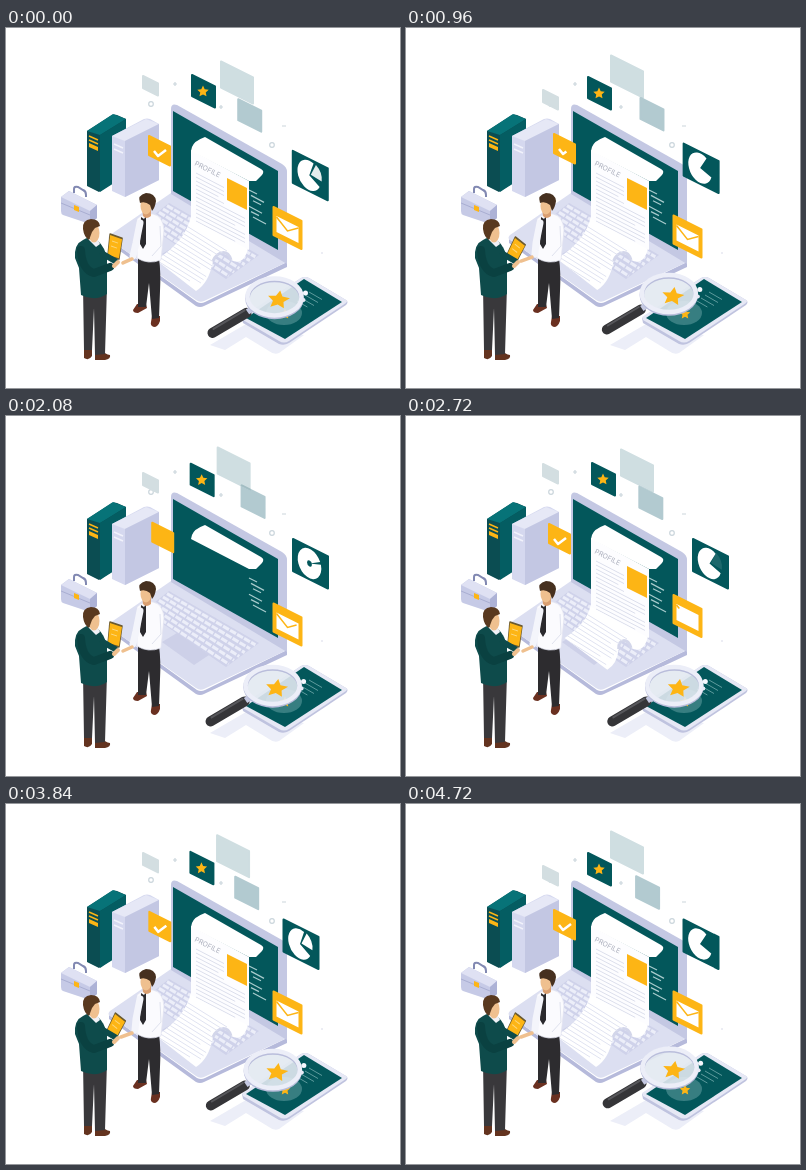
Animation of 394 by 360 pixels, one loop 4.8 s. Source, as an HTML page:

```html
<!DOCTYPE html>
<html lang="en">
<head>
<meta charset="utf-8">
<style>
html, body { margin: 0; width: 100%; height: 100%; overflow: hidden; background: #fff; }
svg { display: block; width: 394px; height: 360px; }
</style>
</head>
<body>
<svg id="stage" viewBox="0 0 394 360" xmlns="http://www.w3.org/2000/svg"></svg>
<script>
const TEAL = '#03575b', GOLD = '#fdb515', SKIN = '#efc08f';
const LOOP = 4800, STEP = 80;
const $ = id => document.getElementById(id);
const lerp = (a, b, k) => a + (b - a) * k;
const clamp = v => Math.max(0, Math.min(1, v));

const poly = (pts, fill, extra = '') => `<polygon points="${pts}" fill="${fill}" ${extra}/>`;
const path = (d, fill, extra = '') => `<path d="${d}" fill="${fill}" ${extra}/>`;
const line = (d, color, w, extra = '') => path(d, 'none', `stroke="${color}" stroke-width="${w}" ${extra}`);
const group = (id, body) => `<g id="${id}">${body}</g>`;
const round = 'stroke-linecap="round" stroke-linejoin="round"';

// Upright isometric panel, origin at its top left corner
const panel = (w, h, fill) =>
  poly(`1,1 ${w - 1},${w / 2} ${w - 1},${w / 2 + h - 1} 1,${h}`, fill, `stroke="${fill}" stroke-width="2" stroke-linejoin="round"`);

function star(r, cx = 0, cy = 0) {
  return Array.from({ length: 10 }, (_, i) => {
    const a = i * Math.PI / 5 - Math.PI / 2, q = i % 2 ? r * .48 : r;
    return `${(cx + q * Math.cos(a)).toFixed(2)},${(cy + q * Math.sin(a)).toFixed(2)}`;
  }).join(' ');
}

// Parallel text rows sloping down to the right
function rows(n, x, y, w, gap, slope, color, dx = 0) {
  let d = '';
  for (let i = 0; i < n; i++) {
    const len = w * (i % 4 === 3 ? .8 : 1);
    d += `M${x + dx * i} ${y + gap * i}l${len} ${len * slope}`;
  }
  return line(d, color, 1);
}

const books =
  path('M81 103L106 87Q108 86 111 87L120 91 119 147 93 164 81 158Z', '#0b4d52') +
  path('M81 103L107 86 120 91 94 107Z', '#077378') +
  path('M94 107L120 91 119 148 94 164Z', '#045d62') +
  line('M83 108l9 4M83 112l9 4', GOLD, 1.4) +
  poly('83,115 92,119 92,123 83,119', GOLD) +
  path('M106 108L138 91Q141 90 144 91L153 96 153 152 119 169 106 163Z', '#d5d8ef') +
  path('M106 108L140 91 153 96 119 113Z', '#e6e8f6') +
  path('M119 113L153 96 153 152 119 169Z', '#c3c7e3') +
  line('M108 116l9 4M108 121l9 4', '#f1f2fb', 1.5);

const briefcase =
  line('M68 165v-4q0-3 4-2l5 3q3 1 3 5v2', '#8289b2', 2) +
  path('M55 169L63 163 91 177 91 190 84 196 57 187Q55 186 55 183Z', '#c6caE6') +
  path('M55 169L63 163 91 177 84 183Z', '#dfe1f3') +
  path('M84 183L91 177 91 190 84 196Z', '#adb2d6') +
  line('M55 175l29 12', '#a9aed2', 1) +
  poly('68,177 73,179 73,184 68,182', GOLD);

function keyboard() {
  let s = poly('163,175 253,227 220,251 138,195', '#cfd2ea');
  for (let i = 0; i < 6; i++) {
    const k = (i + .5) / 6;
    s += line(`M${lerp(163, 139, k)} ${lerp(176, 196, k)}L${lerp(252, 220, k)} ${lerp(227, 250, k)}`,
      '#eceef9', 3.1, 'stroke-dasharray="6.8 1.3"');
  }
  return s;
}

const laptop =
  path('M103 211L191 274Q195 276 199 274L281 234 281 239 198 278Q194 280 190 278L103 215Z', '#b6badb') +
  path('M165 165L281 234 198 273Q194 275 190 272L104 212Q101 210 104 207Z', '#dcdff1') +
  keyboard() +
  poly('156,226 171,217 203,239 188,249', '#cdd0e8') +
  path('M165 81Q165 75 171 77L276 136Q281 139 281 144L281 236 165 166Z', '#c4c8e3') +
  poly('167,83 272,143 272,222 167,163', TEAL) +
  [0, 1, 2, 3, 4, 5].map(i => line(`M${243 + i % 3 * 2} ${162 + 5.4 * i}l${8 + i % 2 * 5} ${4 + i % 2 * 3}`, '#a9cccd', 1.2)).join('');

const paper =
  group('sheet',
    path('', '#fff', 'id="ground"') +
    line('', '#d3d6ea', 3, 'id="curl"') +
    `<g clip-path="url(#groundClip)">${rows(12, 179, 197, 42, 3.2, .62, '#e0e3f1', -2.6)}</g>` +
    path('', '#fdfdff', 'id="front"') +
    `<g clip-path="url(#frontClip)">` +
    `<text transform="translate(188 137) rotate(27)" font-family="Inter, Arial, sans-serif" font-size="6.9" fill="#a9adbb">PROFILE</text>` +
    rows(5, 190, 145, 28, 4, .52, '#dcdfec') +
    rows(10, 190, 165, 49, 4, .52, '#dcdfec') +
    poly('221,150 241,160 241,182 221,172', GOLD) + '</g>') +
  path('M186 119Q188 113 199 109L255 141Q259 143 256 147L250 153 243 153 185 123Z', '#fff');

const bits =
  '<g fill="none" stroke="#cbd6dc" stroke-width="1.2"><circle cx="145" cy="76" r="2.3"/><circle cx="266" cy="117" r="2.3"/>' +
  '<path d="M167 56h4M169 54v4M213 79h4M215 77v4M276 98h4"/></g><circle cx="316" cy="225" r=".8" fill="#d4d7e5"/>';

const cards =
  group('chip', panel(17, 13, '#d3dee1')) +
  group('big', panel(34, 27, '#cfdee1')) +
  group('second', panel(25, 22, '#b2cad0')) +
  `<g clip-path="url(#bigClip)">${group('overlap', panel(25, 22, '#a2bdc2') + line('M2 4l12 5M3 7l7 3', '#76989e', 1, 'stroke-dasharray="2 1"'))}</g>` +
  group('starCard', panel(25, 22, TEAL) + poly(star(6, 12, 17.5), GOLD)) +
  group('check', panel(23, 20, GOLD) +
    line('M6 16l4 5 8-6', '#fff', 2.5, 'id="tick" pathLength="1" stroke-dasharray="1 2" stroke-linejoin="round"')) +
  group('pie', panel(37, 33, TEAL) +
    `<g transform="matrix(1 .45 0 1.25 17.5 25.5)">${path('', '#fff', 'id="disc"')}${path('', '#fff', 'id="slice"')}<circle id="hole" r="2.4" fill="${TEAL}"/></g>`) +
  group('mail', panel(30, 29, GOLD) + poly('4,10 26,21 26,37 4,26', '#fff') +
    line('M4 11L15 25 26 22', GOLD, 1.5, 'id="flap" pathLength="1" stroke-dasharray="1 2"'));

const tablet =
  path('M204 317L240 296 298 307 273 325Q268 327 263 323L240 309 219 322Z', '#eceef8') +
  path('M236 290L295 250Q299 248 303 250L340 272Q343 274 340 277L283 315Q278 318 273 316L237 295Z', '#bfc3df') +
  path('M236 289L295 250Q299 248 303 250L340 272Q342 273 340 275L283 313Q278 316 273 313L237 292Z', '#e6e8f5') +
  poly('240,290 298,251 336,274 279,311', TEAL) +
  rows(4, 303, 264, 13, 3, .58, '#5d9a9c', -4) +
  '<ellipse cx="278" cy="285" rx="18" ry="12" fill="#5b989c" opacity=".6"/>' +
  poly(star(5.5, 279, 286), GOLD);

const lens = group('lens',
  line('M-28 16L-62 36', '#353538', 10, round) +
  line('M-30 13.5L-61 32', '#57575b', 2, round) +
  line('M-27 15l6-4', '#c5c9e2', 6) +
  '<ellipse rx="26" ry="18" fill="#e3e9f1" fill-opacity=".9"/>' +
  `<g transform="translate(4 3) matrix(1 .12 -.15 .82 0 0)">${poly(star(11.5), GOLD)}</g>` +
  '<ellipse cy="1.5" rx="27" ry="18.5" fill="none" stroke="#b9bddb" stroke-width="4.5"/>' +
  '<ellipse rx="27" ry="18.5" fill="none" stroke="#eceef8" stroke-width="4.5"/>' +
  '<circle cx="31" cy="-4" r="2.5" fill="#f6f7fd"/><circle cx="29" cy="3" r="2" fill="#e8eaf6"/>');

const guest =
  path('M131 276l9 0 1 4-9 5q-5 0-5-3zM146 288l8 0 0 5q-2 6-6 6-4-1-3-5z', '#6a3020') +
  path('M132 228L153 230Q155 245 154 263L153 290 146 291 143 255 140 279 132 279Z', '#2d2c2f') +
  path('M131 191Q137 185 147 186 157 188 158 202L155 232Q142 237 131 230Z', '#fbfbfe', 'stroke="#e1e3ef" stroke-width=".7"') +
  path('M135 189l3 2 2-3 0 28-3 5-3-5z', '#2a292d') +
  line('M154 198l1 20-9 10', '#dfe2ee', 1) +
  path('M136 179h9v9q-5 4-8 0z', '#d99f72') +
  `<ellipse cx="140" cy="178" rx="5.5" ry="8.5" fill="${SKIN}"/>` +
  path('M134 175Q131 167 140 165 149 165 150 173 149 180 146 183L144 177Q139 173 134 175Z', '#46301f') +
  line('', '#f4f5fb', 7, 'id="sleeve" ' + round) +
  line('', SKIN, 3.5, 'id="hand" ' + round);

const host =
  path('M78 319l8 0 0 9q-3 5-8 2zM89 323l8 0q2 3 7 4 1 4-5 5l-10 0z', '#63331f') +
  path('M77 258L101 258 99 326 89 327 88 280 86 322 78 322Z', '#39383b') +
  group('slate', poly('-5,-12 7,-8 4,13 -7,10', '#6a5a30', 'stroke="#6a5a30" stroke-width="1.5" stroke-linejoin="round"') +
    poly('-5,-11 7,-7 4,12 -7,9', GOLD) + line('M-3-5l6 2M-4 0l6 2', '#fdd679', 1)) +
  path('M77 212Q84 207 92 213 99 219 101 231L101 266Q89 274 75 267L73 240 69 230Q68 216 77 212Z', '#0e4b4b') +
  path('M82 211l9-1 3 6-4 3z', '#f1f2f8') +
  line('M75 222Q76 242 88 245L104 239', '#0a4141', 8, round) +
  line('M97 226L109 233', '#0e4b4b', 6, round) +
  line('M108 238l4-4', SKIN, 4, round) +
  `<ellipse cx="88" cy="205" rx="5.5" ry="9.5" fill="${SKIN}"/>` +
  path('M77 201Q76 192 85 191 93 191 94 198L89 200 86 204 83 212Q78 209 77 201Z', '#59391f');

$('stage').innerHTML =
  `<defs><clipPath id="frontClip"><path id="frontCut"/></clipPath><clipPath id="groundClip"><path id="groundCut"/></clipPath>` +
  `<clipPath id="bigClip"><polygon id="bigCut" points="0,0 34,17 34,44 0,27"/></clipPath></defs>` +
  books + briefcase + laptop + paper + bits + cards + tablet + lens + guest + host;

const set = (id, name, value) => $(id).setAttribute(name, value);
const move = (id, x, y, more = '') => set(id, 'transform', `translate(${x} ${y}) ${more}`);

function ease(t, from, to) {
  const u = clamp((t - from) / (to - from));
  return u * u * (3 - 2 * u);
}
// 0 at rest, eases to 1 between a and b, and back to 0 between c and d
const hold = (t, a, b, c, d) => ease(t, a, b) - ease(t, c, d);
// One cosine swing per loop, highest at peak
const swing = (t, peak) => Math.cos((t - peak) / LOOP * 2 * Math.PI);

function wedge(from, to, r) {
  const point = deg => `${r * Math.sin(deg * Math.PI / 180)} ${-r * Math.cos(deg * Math.PI / 180)}`;
  return `M0 0L${point(from)}A${r} ${r} 0 ${to - from > 180 ? 1 : 0} 1 ${point(to)}Z`;
}

function drawPaper(p) {
  const drop = 69 * clamp(p), e = clamp(p - 1);
  const front = `M185 122L243 153V${153 + drop}L185 ${122 + drop}Z`;
  set('front', 'd', front);
  set('frontCut', 'd', front);
  $('sheet').style.display = drop > 1 ? '' : 'none';

  const x = lerp(185, 150, e), y = lerp(191, 232, e);
  const arch = `${lerp(230, 207, e)} 233C212 222 222 222 225 232`;
  const ground = `M185 188Q${lerp(185, 180, e)} ${lerp(191, 213, e)} ${x} ${y}L${lerp(236, 190, e)} ${lerp(226, 263, e)}` +
    `Q${lerp(236, 203, e)} ${lerp(226, 255, e)} ${arch}Q239 239 243 216Z`;
  set('ground', 'd', e ? ground : '');
  set('groundCut', 'd', e ? ground : '');
  set('curl', 'd', e > .3 ? 'M' + arch : '');
}

function draw(t) {
  if (t < STEP) t = 2960; // the loop opens on one still from later in the cycle

  const main = hold(t, 1200, 2640, 3360, 4480);
  const early = hold(t, 880, 2000, 2880, 3760);
  const late = hold(t, 1700, 2640, 3700, 4600);
  const side = swing(t, 1700);

  move('starCard', 181 + 4 * main, 48 - 2 * main);
  for (const id of ['big', 'bigCut']) move(id, 204 + 10 * main, 26.5 + 6 * main);
  for (const id of ['second', 'overlap']) move(id, 231.5 + 3.5 * side, 70 - 1.8 * side);
  move('pie', 276.5 + 9.5 * early, 114.5 + 7.5 * early);
  move('check', 147 - 5 * late, 105 + 2 * late);
  move('chip', 136, 61 - 14 * late);
  move('mail', 266.5, 186.5 - 8.5 * hold(t, 2080, 2700, 2960, 3800));
  move('lens', 265.5 + 3 * swing(t, 3000), 266.5 + 3.2 * swing(t, 2400));

  const tick = 1 - hold(t, 800, 1200, 2240, 2640);
  set('tick', 'stroke-dashoffset', 1 - tick);
  set('tick', 'opacity', tick > .02 ? 1 : 0);
  set('flap', 'stroke-dashoffset', hold(t, 2000, 2500, 2640, 2960));

  const closed = hold(t, 1000, 1900, 2100, 2700), slice = hold(t, 2640, 3040, 3840, 4600);
  const gap = 75 - 65 * closed + 25 * slice;
  set('disc', 'd', wedge(70 + gap / 2, 430 - gap / 2, 11.8));
  set('slice', 'd', wedge(28, 98, 11));
  set('slice', 'transform', 'translate(1.5 -1)');
  set('slice', 'opacity', slice);
  set('hole', 'opacity', closed);

  drawPaper(2 - 2 * hold(t, 900, 1760, 2080, 2900));

  const give = 1 - early;
  move('slate', 109 + give, 218 + 4 * give, `rotate(${20 * give})`);
  set('sleeve', 'd', `M134 195L130 215 ${lerp(127, 129, give)} ${lerp(228, 226, give)}`);
  set('hand', 'd', `M126 ${lerp(231, 229, give)}L${lerp(117, 115, give)} ${lerp(235, 233, give)}`);
}

function loop() {
  draw(Math.floor(performance.now() % LOOP / STEP) * STEP);
  requestAnimationFrame(loop);
}
loop();
</script>
</body>
</html>
```
